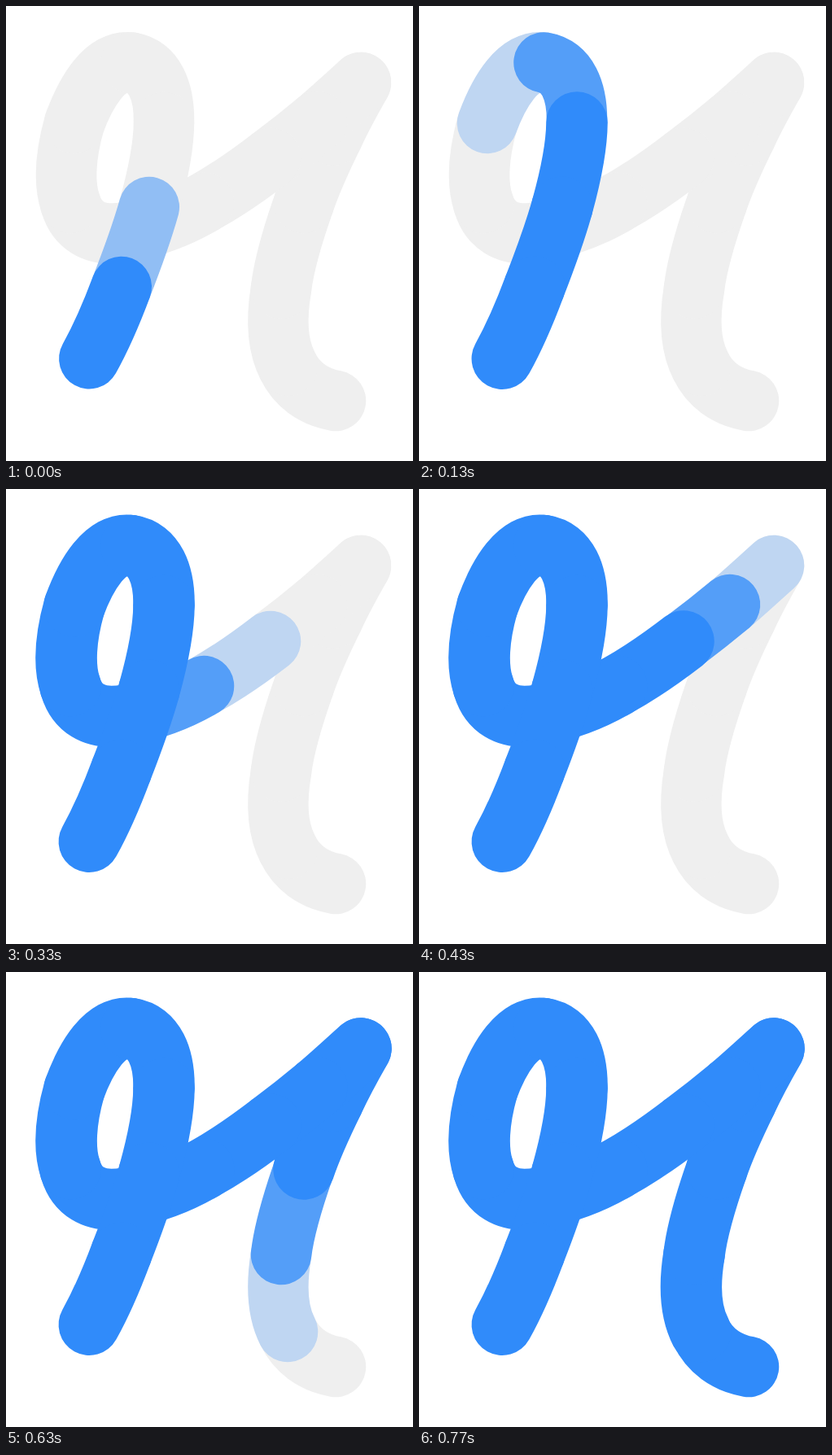
Animation of 500 by 559 pixels, one loop 0.93 s. Source, as an HTML page:

```html
<!DOCTYPE html>
<html lang="en">
<head>
<meta charset="utf-8">
<title>Handwritten stroke</title>
<style>
  html, body { margin: 0; width: 100%; height: 100%; overflow: hidden; background: #fff; }
  svg { display: block; width: 100%; height: 100%; }
  path { fill: none; stroke: #efefef; stroke-width: 74.5; stroke-linecap: round; stroke-linejoin: round; }
  path.set { stroke-width: 75.5; }
</style>
</head>
<body>
<svg id="stage" viewBox="0 0 500 559"></svg>
<script>
const LOOP = 930, LAST = 23;
const GREY = [239, 239, 239], BLUE = [48, 139, 250];
const FADE = [0, .25, .49, .67, .81, 1];

// Pen path: a start point, then one cubic piece per entry.
const start = '102.3 433.3';
const pieces = [
  '118 405 131 374 141.8 345',
  '154.3 313 166.8 279 175.8 247',
  '185.8 211 193.8 174 194 143',
  '194.6 104 182 74 153.5 69.5',
  '122 65 98.3 105 84 144',
  '73 183 71 218 79 242',
  '86 266 105 286 150 277.3',
  '181 271.3 214 259.2 243 242',
  '272 226 299 207 325 187',
  '345 172 364 157 382 142',
  '401 126 418 110 436 94',
  '424 115 412 137 402 158.5',
  '388 187 375 215 366 242',
  '353 279 342 314 338 347',
  '332 383 333 417 346 442',
  '357 465 377 480 405 485'
];

const stage = document.getElementById('stage');
let from = start;
const strokes = pieces.map(piece => {
  const path = document.createElementNS('http://www.w3.org/2000/svg', 'path');
  path.setAttribute('d', `M${from}C${piece}`);
  from = piece.split(' ').slice(4).join(' ');
  stage.prepend(path); // earlier pieces lie on top
  return path;
});

const mix = a => `rgb(${GREY.map((g, i) => Math.round(g + (BLUE[i] - g) * a))})`;

// 30 steps per second, with step times rounded to 10 ms.
const stepAt = ms => Math.min(LAST, Math.floor((Math.floor(ms / 10) * 10 + 5) * .03));

function draw(ms) {
  const step = stepAt(ms % LOOP);
  strokes.forEach((path, i) => {
    const age = 2 * step - 3 * i + 5;
    path.style.stroke = mix(FADE[Math.max(0, Math.min(FADE.length - 1, age))]);
    path.classList.toggle('set', age > FADE.length); // the ink spreads slightly once dry
  });
}

const t0 = performance.now();
function tick() {
  draw(performance.now() - t0);
  requestAnimationFrame(tick);
}
tick();
</script>
</body>
</html>
```
